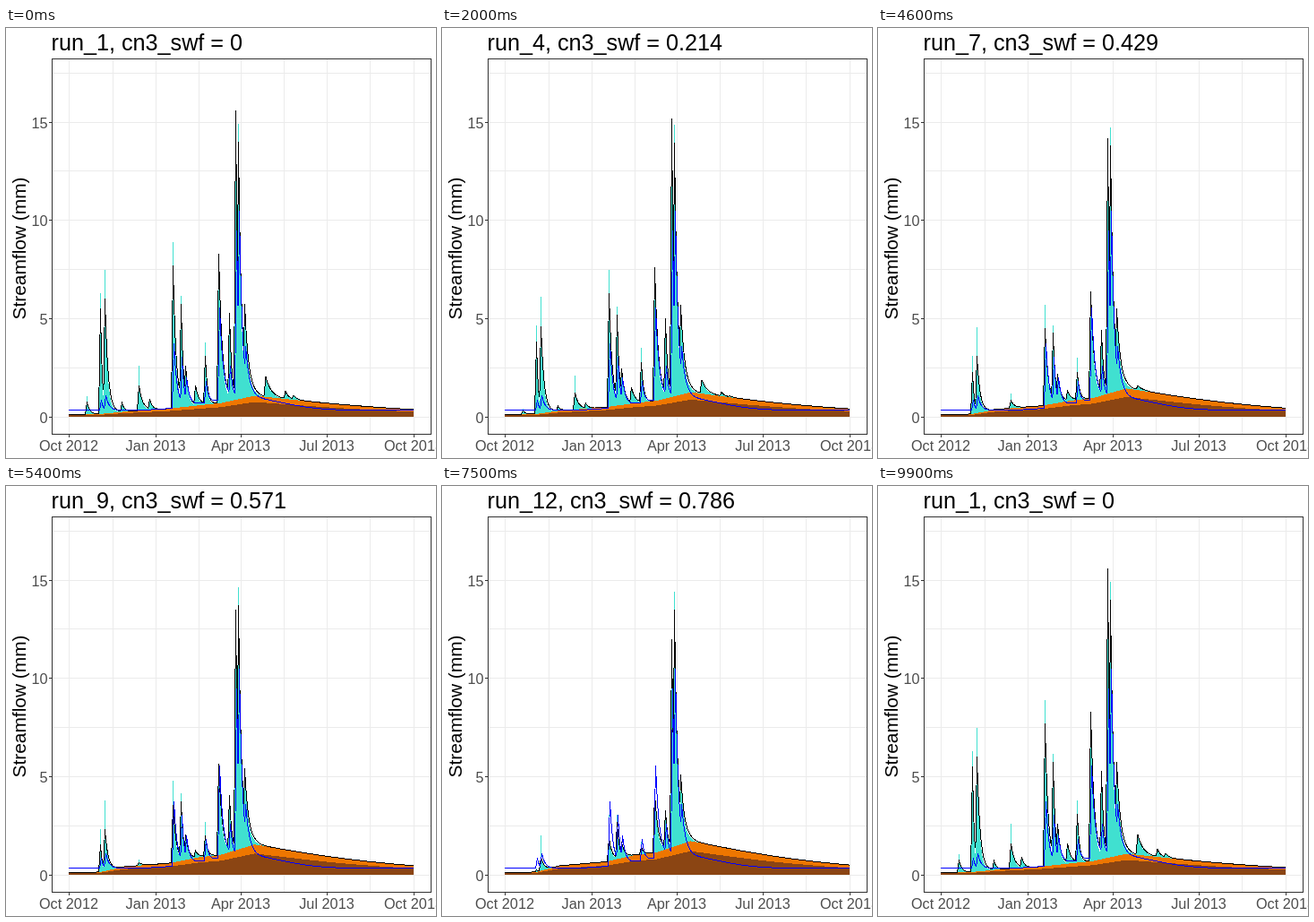
Animation of 480 by 480 pixels, one loop 10000 ms. Source, as an HTML page:

```html
<!DOCTYPE html>
<html lang="en">
<head>
<meta charset="utf-8">
<title>Streamflow by run</title>
<style>
  html, body { margin: 0; width: 100%; height: 100%; overflow: hidden; background: #fff; }
  svg { display: block; width: 480px; height: 480px; font-family: "Liberation Sans", Arial, sans-serif; }
  .crisp { shape-rendering: crispEdges; }
  .line { fill: none; stroke-width: 1; }
  .axis { font-size: 16.3px; fill: #4d4d4d; }
</style>
</head>
<body>
<svg viewBox="0 0 480 480">
  <text id="title" x="50.5" y="25" font-size="25.2"></text>
  <text transform="translate(21.5 246) rotate(-90)" text-anchor="middle" font-size="20.9">Streamflow (mm)</text>
  <g id="grid" class="crisp" stroke="#ebebeb"></g>
  <g class="crisp">
    <path id="quick" fill="#40e0d0"/>
    <path id="lateral" fill="#ee7600"/>
    <path id="ground" fill="#8b4513"/>
    <path id="total" class="line" stroke="#000"/>
    <path id="observed" class="line" stroke="#00f"/>
    <rect x="51.5" y="34.5" width="423" height="419" fill="none" stroke="#333"/>
  </g>
  <g id="ticks" class="crisp" stroke="#333"></g>
  <g id="labels" class="axis"></g>
</svg>
<script>
const $ = id => document.getElementById(id);
const LOOP = 10000, RUNS = 15, LEFT = 70, RIGHT = 455, CREST = 277;
const STARTS = [400, 1100, 1800, 2500, 3200, 3900, 4600, 5200,
                5900, 6600, 7300, 7900, 8500, 9100, 9700];

// x, recession length, peak in the first and last runs, observed peak, extra runoff on the day
const STORMS = [
  [90.5, 3, .75, -.3, 0, .5],
  [105.5, 2, 5.5, -.6, .85, .8],
  [110.5, 3.5, 6, 0, 1.1, 1.5],
  [129.5, 3, .7, 0],
  [148.5, 4, 1.6, 0, 0, 1],
  [160.5, 3, .9, 0],
  [186.5, 3.5, 7.7, .7, 3.75, 1.2],
  [195.5, 2.5, 5.75, 1.9, 3.05, .4],
  [200.5, 3.5, 2.6, 1.4, 2],
  [211.5, 4, 1.6, .8],
  [222.5, 2.5, 3.1, 1, 1.8, .7],
  [237.5, 4, 8.3, 3.1, 5.55],
  [249.5, 2.5, 5.3, 2.7, 2.6],
  [256.5, 2.5, 15.6, 10.8, 9.5],
  [259.5, 3.5, 14, 13.3, 10.5, .9],
  [266.5, 4.5, 5.75, 4.9, 3.6],
  [290, 6, 2.05, .8],
  [312, 4, 1.3, .8],
  [321, 4, 1.1, .8]
].map(([x, tau, wet, dry, seen = 0, flash = 0]) => ({ x, tau, wet, dry, seen, flash }));

// baseflow up to its crest: x, first run, last run
const RISE = [[70, .1, .12], [105, .14, .14], [132, .26, .5], [182, .42, .7],
              [215, .58, 1.08], [240, .7, 1.22], [CREST, 1.07, 1.83]];
const TAIL = [.37, .52];

const lerp = (a, b, f) => a + (b - a) * f;
const py = v => 434 - v * 21.93;
const point = (x, v) => x + " " + py(v).toFixed(2);
const xs = Array.from({ length: (RIGHT - LEFT) * 2 + 1 }, (_, i) => LEFT + i / 2);

function baseflow(x, u) {
  if (x > CREST) {
    const crest = lerp(1.07, 1.83, u), end = lerp(TAIL[0], TAIL[1], u);
    return crest * (end / crest) ** (((x - CREST) / (RIGHT - CREST)) ** 1.15);
  }
  const i = Math.max(1, RISE.findIndex(p => p[0] >= x));
  const [a, b] = [RISE[i - 1], RISE[i]];
  const f = (x - a[0]) / (b[0] - a[0]);
  return lerp(lerp(a[1], b[1], f), lerp(a[2], b[2], f), u);
}

// steep rise, exponential recession; the highest pulse wins
const pulses = (list, x, shrink = 1) => Math.max(...list.map(({ x: at, tau, size }) => {
  const d = x - at;
  return size * (d < 0 ? Math.max(0, 1 + d / 2) : Math.exp(-d / (tau * shrink)));
}));

function buildRun(_, run) {
  const u = run / 13;
  const storms = STORMS.map(s => {
    const peak = lerp(s.wet, s.dry, u ** (1 + s.dry / s.wet));
    return { ...s, size: Math.max(0, peak - baseflow(s.x, u)) };
  });
  const lateral = xs.map(x => baseflow(x, u));
  return {
    lateral,
    ground: lateral.map(v => v * 0.7),
    quick: xs.map((x, i) => lateral[i] + pulses(storms, x, 0.85)),
    total: xs.map((x, i) => lateral[i] + pulses(storms, x)),
    bars: storms.map(s => baseflow(s.x, u) + s.size + s.flash * Math.min(1, s.size))
  };
}

const runs = Array.from({ length: RUNS }, buildRun);
const linePath = vs => "M" + vs.map((v, i) => point(xs[i], v)).join("L");
const areaPath = vs => linePath(vs) + `L${point(RIGHT, 0)}L${point(LEFT, 0)}Z`;

function draw(a, b, f) {
  const mix = key => runs[a][key].map((v, i) => lerp(v, runs[b][key][i], f));
  const bars = mix("bars").map((h, i) =>
    `M${point(Math.floor(STORMS[i].x - 0.5), h)}h1V434h-1Z`).join("");
  $("quick").setAttribute("d", areaPath(mix("quick")) + bars);
  $("lateral").setAttribute("d", areaPath(mix("lateral")));
  $("ground").setAttribute("d", areaPath(mix("ground")));
  $("total").setAttribute("d", linePath(mix("total")));
  const run = f < 0.5 ? a : b;
  $("title").textContent = `run_${run + 1}, cn3_swf = ${+(run / 14).toFixed(3)}`;
}

function drawObserved() {
  const base = x => 0.33 + 0.65 * Math.exp(-(((x - 265) / 60) ** 2));
  const storms = STORMS.map(s =>
    ({ ...s, x: s.x + 1, size: Math.max(0, s.seen - base(s.x)) }));
  $("observed").setAttribute("d", linePath(xs.map(x => base(x) + pulses(storms, x))));
}

function add(parent, tag, attrs, text = "") {
  const el = document.createElementNS("http://www.w3.org/2000/svg", tag);
  for (const k in attrs) el.setAttribute(k, attrs[k]);
  el.textContent = text;
  $(parent).append(el);
}
const rule = (parent, x1, y1, x2, y2) => add(parent, "line", { x1, y1, x2, y2 });

function drawAxes() {
  for (let v = 0; v <= 17.5; v += 2.5) {
    const y = Math.floor(py(v)) + 0.5;
    rule("grid", 52, y, 474, y);
    if (v % 5) continue;
    rule("ticks", 48, y, 51, y);
    add("labels", "text", { x: 46.5, y: y + 6, "text-anchor": "end" }, v);
  }
  const dayX = d => LEFT + d * (RIGHT - LEFT) / 365;
  const column = x => Math.round(x) + 0.5;
  const days = [0, 92, 182, 273, 365];
  ["Oct 2012", "Jan 2013", "Apr 2013", "Jul 2013", "Oct 2013"].forEach((name, i) => {
    const x = column(dayX(days[i]));
    rule("grid", x, 35, x, 453);
    rule("ticks", x, 454, x, 457);
    add("labels", "text", { x: x - 0.5, y: 472, "text-anchor": "middle" }, name);
    if (i === 4) return;
    const mid = column(dayX((days[i] + days[i + 1]) / 2));
    rule("grid", mid, 35, mid, 453);
  });
}

let shown = "";
function tick() {
  const t = performance.now() % LOOP;
  const i = STARTS.filter(s => s <= t).length - 1;
  const step = i < 0 ? 0 : Math.min(3, Math.floor((t - STARTS[i]) / 100) + 1);
  const state = i + ":" + step;
  if (state !== shown) {
    shown = state;
    draw(Math.max(0, i), (i + 1) % RUNS, step / 3);
  }
  requestAnimationFrame(tick);
}

drawAxes();
drawObserved();
tick();
</script>
</body>
</html>
```
